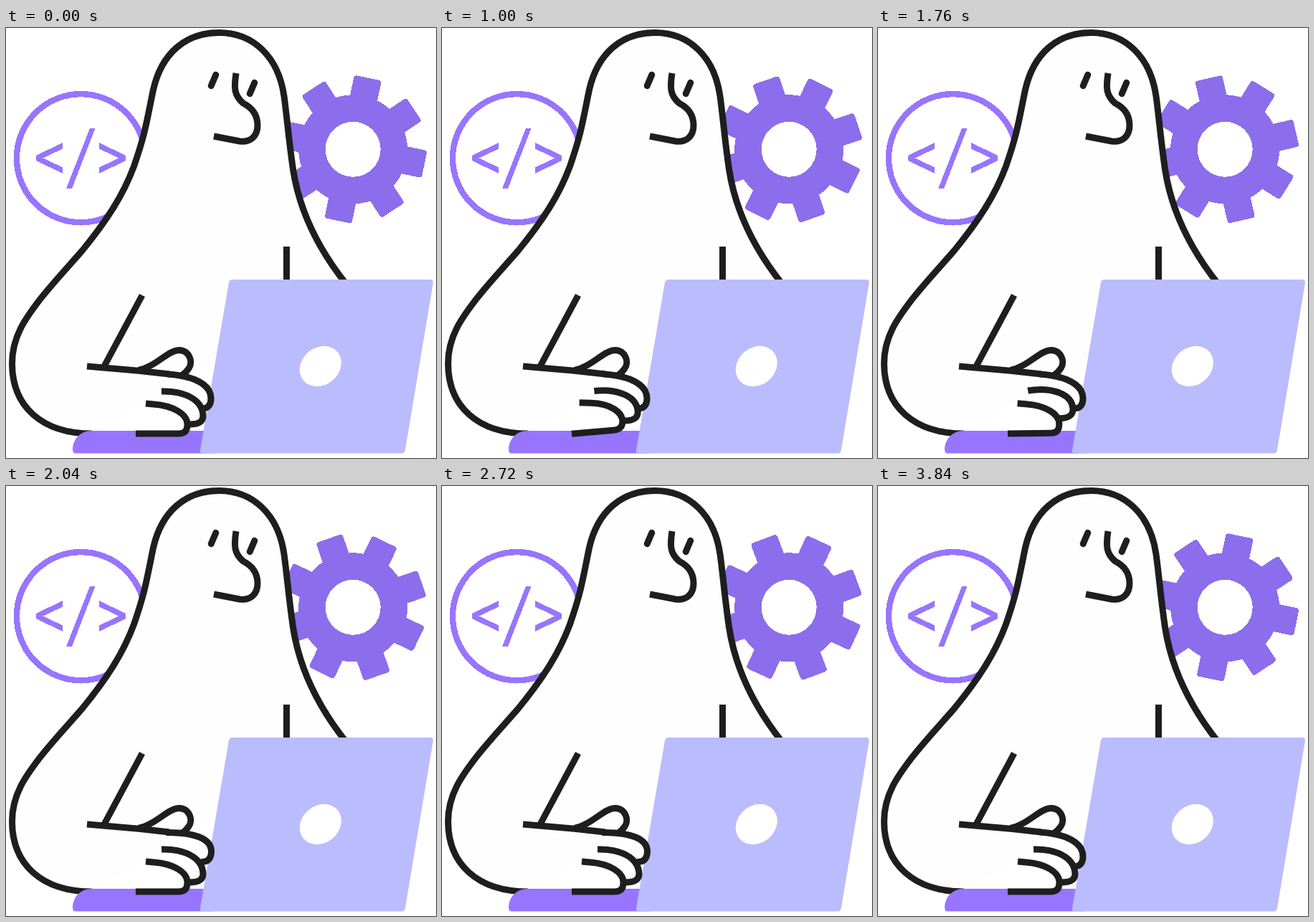
Recreate the animation shown at these times as an HTML page. Size 600 px wide and 600 px high, loop 3.88 s.

```html
<!DOCTYPE html>
<html lang="en">
<head>
<meta charset="utf-8">
<title>Typing at a laptop</title>
<style>
  html, body { margin: 0; width: 100%; height: 100%; overflow: hidden; background: #fff; }
  svg { display: block; width: 100vw; height: 100vh; }
  .ink { fill: none; stroke: #1e1e1e; stroke-width: 9; }
  .eye { stroke-linecap: round; }
  .violet { fill: #9775fe; }
  .crisp { shape-rendering: crispEdges; }
</style>
</head>
<body>
<svg viewBox="0 0 600 600">
  <!-- code badge -->
  <g class="crisp">
    <circle cx="104.500" cy="181.700" r="89.600" fill="none" stroke="#9775fe" stroke-width="8.400"/>
    <path class="violet" d="M79 160V168.500L51.500 181.500L79 194.500V203L42 185V178ZM130 160V168.500L157.500 181.500L130 194.500V203L167 185V178ZM117 140H124.500L92 224H84Z"/>
  </g>

  <g class="crisp" transform="translate(484.200 169.300)">
    <g id="gear" fill="#8c6dec"><circle r="76"/></g>
    <circle r="38.500" fill="#fff"/>
  </g>

  <!-- body -->
  <path class="ink" style="fill:#fefefe" d="M474.500 357C434 306 409 253 400.500 197C394 152 392.500 128 388 95C380 40 345 6.500 297 6.500C250 6.500 217 36 205.500 86C195 137 194 148 178.500 193C164 232 142 267 106 311C86 334 66 355 48 378C28 404 8.500 430 8.500 468C8.500 528 50 566 120 566"/>
  <path class="ink" d="M321 63C318 83 318 94 331 105C345 112 351 123 351 136C351 151 341 160 326 158L290 151"/>
  <path class="ink eye" d="M292.800 65.300L286.200 80.700"/>
  <path class="ink eye" d="M346.800 76.300L340.200 91.700"/>
  <path class="ink" d="M391.500 305V356M190 373L137 472"/>

  <!-- desk mat and laptop -->
  <path class="violet" d="M93 588C93 574 104 562 119 562H290V593.500H97Q93 593.500 93 588Z"/>
  <path fill="#babcfd" d="M316 351H592Q596.500 351 596 355.500L557 589Q556 593.500 552 593.500H274Q270 593.500 271 589L311 355Q312 351 316 351Z"/>
  <ellipse rx="31" ry="26" fill="#fff" transform="translate(438.800 472) rotate(-40)"/>

  <!-- hand -->
  <path class="ink" d="M113 472L185 478.300L228 483M185 477.500C210 472 226 449.500 242 449.500C257 450.500 261 467 255 475Q251 481 245 485"/>
  <path class="ink" id="ring"/>
  <path class="ink" id="middle"/>
  <path class="ink" id="index"/>
</svg>
<script>
const LOOP = 3880, CYCLE = 680, CYCLES = 5, LIFT = 440;
const gear = document.getElementById('gear');
const eyes = document.querySelectorAll('.eye');

for (let i = 0; i < 8; i++) {
  const tooth = document.createElementNS('http://www.w3.org/2000/svg', 'rect');
  const attrs = { x: -19.4, y: -101.8, width: 38.8, height: 50, rx: 4, transform: `rotate(${i * 45})` };
  for (const key in attrs) tooth.setAttribute(key, attrs[key]);
  gear.append(tooth);
}

// Each finger has a resting and a raised path of matching structure.
const fingers = [
  { id: 'ring', start: 0,
    rest: 'M195 524L206 525C234 527 253 539 253 553C253 562 249 566 241 566L181 566',
    up: 'M189 522L210 522C238 522 251 535 251 546C251 553 247 556 237 557.5L181 566.5' },
  { id: 'middle', start: 200,
    rest: 'M217 507C246 506 274 517 275 541C275 549 270 553 256 553',
    up: 'M209 506C238 501 270 508 272 531C272 540 267 544.5 252 544.5' },
  { id: 'index', start: 420,
    rest: 'M226 483C262 485.5 286 497 286 517C286 527 281 531 274 531',
    up: 'M223 483.5C262 483 287 491 286.5 510C286 520 281 524 272 524' }
];
for (const f of fingers) f.el = document.getElementById(f.id);

const blend = (a, b, k) => {
  const goal = b.match(/[\d.]+/g);
  let i = 0;
  return a.replace(/[\d.]+/g, n => (+n + (goal[i++] - n) * k).toFixed(2));
};

function lift(t, start) {
  const n = Math.floor((t - start) / CYCLE);
  const u = (t - start - n * CYCLE) / LIFT;
  if (n < 0 || n >= CYCLES || u >= 1) return 0;
  return Math.sin(Math.PI * u) ** 2;
}

const isBlink = t => {
  const phase = t % (LOOP / 3);
  return phase >= 475 && phase < 598;
};

function draw(now) {
  const t = now % LOOP, p = t / LOOP;
  gear.setAttribute('transform', `rotate(${11.8 + 360 * p * p * (3 - 2 * p)})`);
  const turn = isBlink(t) ? 90 : 0;
  eyes[0].setAttribute('transform', `rotate(${-turn} 289.5 73)`);
  eyes[1].setAttribute('transform', `rotate(${-turn} 343.5 84)`);
  for (const f of fingers) f.el.setAttribute('d', blend(f.rest, f.up, lift(t, f.start)));
}

const origin = performance.now();
function tick() {
  draw(performance.now() - origin);
  requestAnimationFrame(tick);
}
tick();
</script>
</body>
</html>
```
